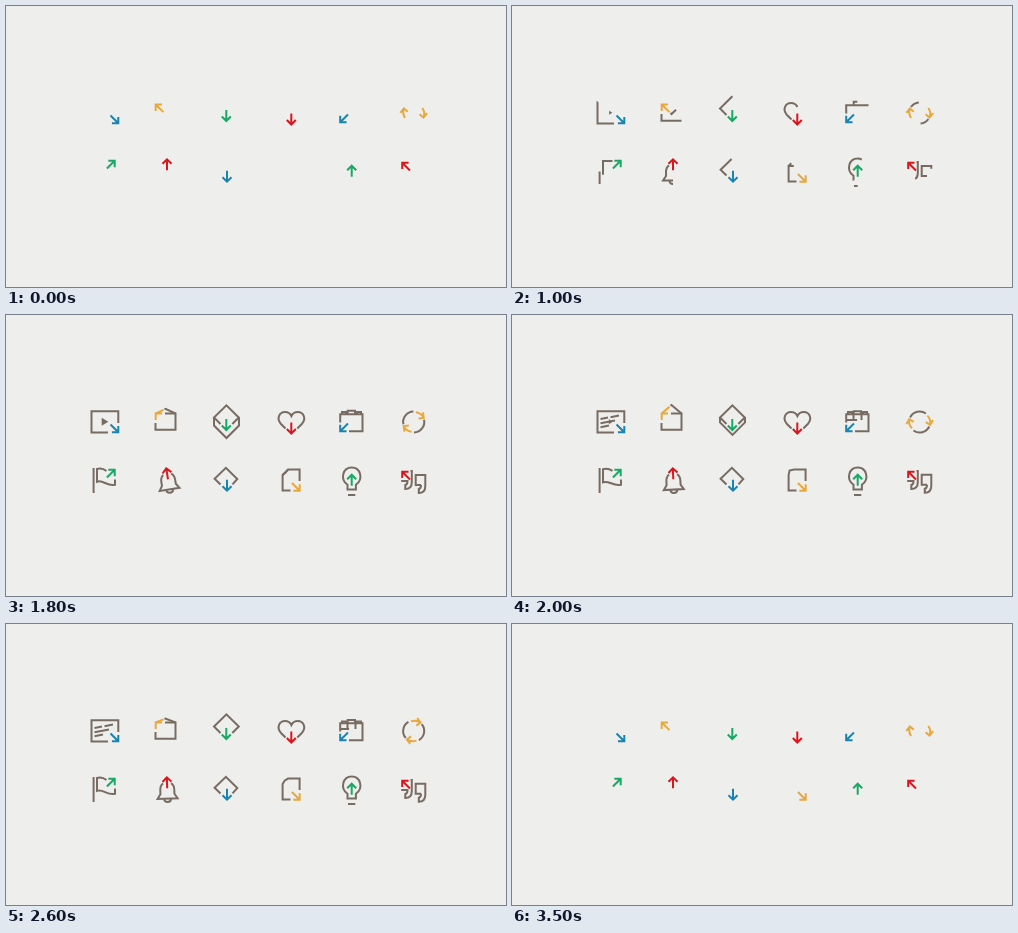
Write an HTML page that moves like this. It is 500 px wide and 281 px high and loops after 3.6 s.

```html
<!DOCTYPE html>
<html lang="en">
<head>
<meta charset="utf-8">
<title>Icon set</title>
<style>
html, body { margin: 0; width: 100%; height: 100%; overflow: hidden; background: #eeeeec; }
svg { display: block; width: 100vw; height: 100vh; fill: none; stroke-width: 2; }
</style>
</head>
<body>
<svg id="stage" viewBox="0 0 500 281"></svg>
<script>
const BLUE = '#1a84b0', YELLOW = '#e9a83c', GREEN = '#18a964', RED = '#d9161e', GRAY = '#786c62';
const LOOP = 3600, STEP = 100;
const stage = document.getElementById('stage');

const clamp = x => Math.min(1, Math.max(0, x));
const ease = x => x * x * (3 - 2 * x);
const ramp = (t, a, b) => ease(clamp((t - a) / (b - a)));
// rises during a..b, holds, falls during c..d
const hold = (t, a, b, c, d) => ramp(t, a, b) - ramp(t, c, d);

const path = (color, d, extra = '') => `<path stroke="${color}" d="${d}" ${extra}/>`;
const group = (transform, body) => `<g transform="${transform}">${body}</g>`;
// arrow with its tip at x,y; 0 degrees points up
const arrow = (color, x, y, deg) =>
  group(`translate(${x} ${y}) rotate(${deg})`, path(color, 'M0 11V0M-4.5 4.5L0 0L4.5 4.5'));

function trace(d, shown) {
  if (shown <= 0) return '';
  return path(GRAY, d, shown < 1 ? `pathLength="1" stroke-dasharray="${shown} 2"` : '');
}

function video(t, line) {
  const k = hold(t, 1850, 2200, 2600, 2900);
  const s = (1 - k) * line(1);
  const text = 'M88.5 104L96 102.6M98.5 102.2L107 100.6M88.5 108.3L103 105.6M88.5 112.2L97 110.6';
  return line('M102 117.5H85.5V96.2H112.3V108') +
    group(`translate(98.5 106.7) scale(${s})`, `<path fill="${GRAY}" d="M-2.8 -4L3.8 0L-2.8 4Z"/>`) +
    trace(text, k) + arrow(BLUE, 112.3, 117.3, 135);
}

function envelope(t, line) {
  const k = hold(t, 1450, 1950, 2450, 2900);
  const top = 108 - 18 * k;
  const mid = 98.5 + (top - 98.5) * .8;
  const join = 98.5 + (top - 98.5) * .9;
  return line('M149.5 108V114.8H169.5V98.5H159') +
    line(`M158.5 ${join}L159.5 ${top}L169.5 98.5`) +
    path(YELLOW, `M149.7 105V98.5H156M149.7 98.5L157.5 ${mid}`);
}

function cube(t, line) {
  const h = 8 * hold(t, 1450, 1750, 1850, 2200);
  const sides = h > .1
    ? path(GRAY, `M208 102.5V${102.5 + h}L220.5 ${115 + h}L233 ${102.5 + h}V102.5`) : '';
  return line('M214.5 109L208 102.5L220.4 90.3L232.8 102.5L226.3 109') + sides +
    arrow(GREEN, 220.3, 115, 180);
}

function heart(t, line) {
  const s = 1 + .05 * hold(t, 2000, 2250, 2350, 2600);
  return group(`translate(285.4 107) scale(${s}) translate(-285.4 -107)`,
    line('M279.5 113.5L275 109C270 103.5 273.5 97 279 97C282.5 97 284.5 99 285.4 101' +
      'C286.3 99 288.3 97 291.8 97C297.3 97 300.8 103.5 295.8 109L291.3 113.5')) +
    arrow(RED, 285.3, 118.5, 180);
}

function briefcase(t, line) {
  const k = hold(t, 1500, 1850, 2500, 2850);
  const open = hold(t, 1850, 2250, 2400, 2700);
  const y = 95.7 + 1.6 * open;
  const studs = k > .05 ? path(GRAY, `M336 99V${99 - 2 * k}H340V99M351 99V${99 - 2 * k}H355V99`) : '';
  return line('M334.2 107.5V99.2H356.5V116.3H343') +
    line(`M341.7 99V${y}H349V99`) + studs +
    trace('M334 105H357M341.5 99V105M349.5 99V105', open) +
    arrow(BLUE, 334.2, 116.2, 225);
}

function refresh(t, line) {
  const deg = 360 * clamp((t - 1100) / 1900);
  const half = line('M-8.7 -6A10.5 10.5 0 0 1 7.5 -7.3') +
    path(YELLOW, 'M-8.6 5A10.3 10.3 0 0 1 -9.8 -4.6M-13.4 -.2L-9.8 -4.6L-5.9 -1.2');
  return group(`translate(407.7 107) rotate(${deg})`, half + group('rotate(180)', half));
}

function flag(t, line) {
  const w = 2.3 * hold(t, 1400, 1750, 3000, 3400) * (1 + .15 * Math.sin(t / 120));
  return line('M87.6 178V153') +
    line(`M100.5 ${155 + w * .4}Q96 ${155 - w} 91 ${155 - w * .4}V${169.3 - w}` +
      `C97 ${169.3 - 2 * w} 101 ${169.3 + w} 109 ${169.3 + w * .2}V164.5`) +
    arrow(GREEN, 108.7, 154.8, 45);
}

function bell(t, line) {
  const on = t > 1550 && t < 3050;
  const deg = on ? -9 * Math.sin((t - 1550) * Math.PI / 500) * clamp((3050 - t) / 600) : 0;
  return group(`rotate(${deg} 161 158)`,
    line('M157 159.3C154.4 161 154 163.5 154 166V170L151 174.6H171L168 170V166C168 163.5 167.6 161 165 159.3') +
    line('M157.5 175C158 179 164 179 164.5 175') + arrow(RED, 161, 153.3, 0));
}

function diamond(t, line) {
  return line('M214.5 169.5L208.6 163.7L219.9 152.8L231.3 164L226.5 169.3') +
    arrow(BLUE, 221, 175.7, 180);
}

function sheet(t, line) {
  const k = hold(t, 1450, 2200, 2350, 2950);
  const x = 282 - 5.4 * k, y = 160 - 5.4 * k;
  return line(`M284.5 175.5H276.6V160L${x} ${y}L282 154.6H293.6V166`) +
    (k < .5 ? line('M276.6 160L282 154.6') : '') +
    (t >= STEP ? arrow(YELLOW, 293.7, 175.7, 135) : '');
}

function bulb(t, line) {
  return line('M341.5 174.6V169.8C333.5 164 337 152.6 345.7 152.6S357.9 164 349.9 169.8V174.6Z') +
    line('M342 180H349.3') + arrow(GREEN, 345.7, 159.7, 0);
}

function quotes(t, line) {
  const lift = 3 * hold(t, 1950, 2250, 2350, 2650);
  const tail = 'V171Q419.3 178 412.8 178V174Q415 173.5 415 170';
  return group('translate(-13.5 -4)', line('M418 160H419.3' + tail + 'H409.7V169')) +
    group(`translate(0 ${-lift})`, line('M415 170H409.7V160H419.3' + tail)) +
    arrow(RED, 396.2, 156.7, -45);
}

const icons = [video, envelope, cube, heart, briefcase, refresh,
  flag, bell, diamond, sheet, bulb, quotes];

function frame(now) {
  const t = Math.floor(now % LOOP / STEP) * STEP;
  const shown = hold(t, 700, 1300, 3000, 3500);
  const line = d => d === 1 ? shown : trace(d, shown);
  stage.innerHTML = icons.map(icon => icon(t, line)).join('');
  requestAnimationFrame(frame);
}
frame(0);
</script>
</body>
</html>
```
